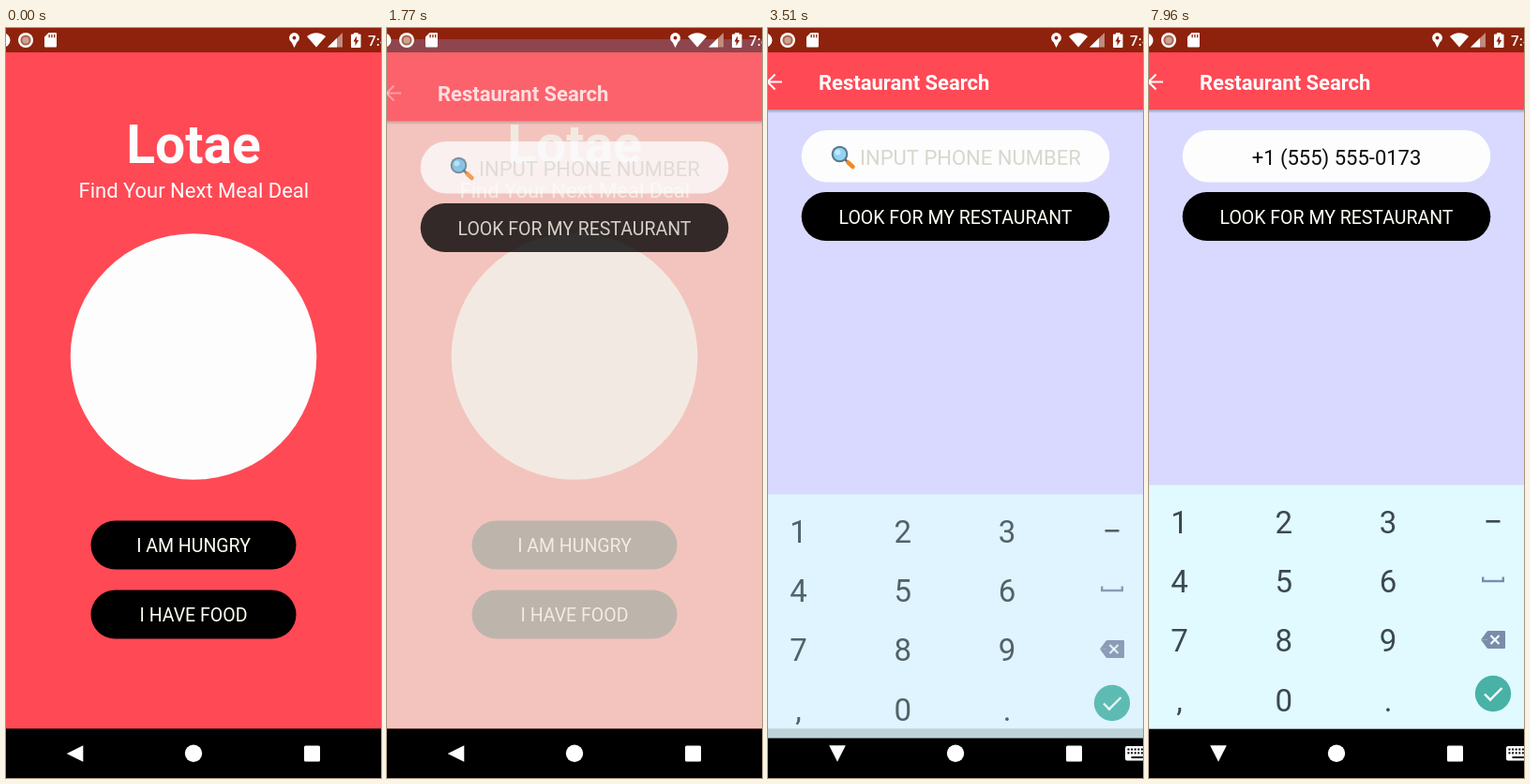
Write an HTML page with a canvas that moves like this. It is 400 px wide and 800 px high and loops after 8000 ms.

```html
<!DOCTYPE html>
<html lang="en">
<head>
<meta charset="utf-8">
<title>Meal deals</title>
<style>
  html, body { margin: 0; width: 100%; height: 100%; overflow: hidden; background: #000; }
  canvas { display: block; width: 400px; height: 800px; }
</style>
</head>
<body>
<canvas id="stage" width="400" height="800"></canvas>
<script>
const ctx = document.getElementById('stage').getContext('2d');
const LOOP = 8000;
const MID = 200;
const NAV_TOP = 747.5, STATUS_BOTTOM = 26;
const RED = '#ff4955', LAVENDER = '#d9d9ff', WARM = '#f0e6da';
const STATUS = '#8e220c', WHITE = '#fdfdfe', SOFT = '#7b8ca9';
const PHONE = '+1 (555) 555-0173';
const FOCUS = 2840;
const BURSTS = [
  { at: 3820, step: 490, from: 6, to: 7 },
  { at: 5830, step: 265, from: 10, to: 12 },
  { at: 7140, step: 77, from: 14, to: 17 },
];

function rect(x, y, w, h, color, r = 0) {
  ctx.fillStyle = color;
  ctx.beginPath();
  ctx.roundRect(x, y, w, h, r);
  ctx.fill();
}

function circle(x, y, r, color) {
  ctx.fillStyle = color;
  ctx.beginPath();
  ctx.arc(x, y, r, 0, Math.PI * 2);
  ctx.fill();
}

function line(color, width, x1, y1, x2, y2) {
  ctx.strokeStyle = color;
  ctx.lineWidth = width;
  ctx.beginPath();
  ctx.moveTo(x1, y1);
  ctx.lineTo(x2, y2);
  ctx.stroke();
}

// Right-angled corner at (x, y) with legs w and h, which may be negative.
function corner(x, y, w, h, color) {
  ctx.fillStyle = color;
  ctx.beginPath();
  ctx.moveTo(x, y);
  ctx.lineTo(x + w, y);
  ctx.lineTo(x, y + h);
  ctx.fill();
}

// Isosceles triangle whose tip points along (dx, dy).
function pointer(x, y, half, dx, dy, color) {
  ctx.fillStyle = color;
  ctx.beginPath();
  ctx.moveTo(x + dx * half, y + dy * half);
  ctx.lineTo(x - dx * half + dy * half, y - dy * half + dx * half);
  ctx.lineTo(x - dx * half - dy * half, y - dy * half - dx * half);
  ctx.fill();
}

function text(str, x, y, size, color, { weight = 400, align = 'center' } = {}) {
  ctx.font = `${weight} ${size}px Roboto, sans-serif`;
  ctx.textAlign = align;
  ctx.fillStyle = color;
  ctx.fillText(str, x, y);
}

function pillButton(label, y, w) {
  rect(MID - w / 2, y, w, 52, '#000', 26);
  text(label, MID, y + 33.7, 19.5, '#fffff4');
}

function drawHome() {
  rect(0, STATUS_BOTTOM, 400, NAV_TOP - STATUS_BOTTOM, RED);
  text('Lotae', MID, 144, 57, WHITE, { weight: 700 });
  text('Find Your Next Meal Deal', MID + 0.3, 181, 22, WHITE);
  circle(MID, 350.5, 131.3, WHITE);
  pillButton('I AM HUNGRY', 525.6, 219);
  pillButton('I HAVE FOOD', 599.6, 219);
}

function drawMagnifier(x, y) {
  ctx.lineCap = 'round';
  line('#5d6870', 2.5, x, y, x + 8, y + 8);
  line('#f08a24', 4.5, x + 9, y + 9, x + 14, y + 13.5);
  ctx.lineCap = 'butt';
  circle(x, y, 8.8, '#5b7686');
  circle(x, y, 6.8, '#8fd3f6');
  circle(x - 2, y - 2, 3, '#c4eafc');
}

// How much of the number is typed, and when the last key was pressed.
function typing(t) {
  const burst = BURSTS.findLast(({ at }) => t >= at);
  if (!burst) return { length: 0, last: FOCUS };
  const { at, step, from, to } = burst;
  const keys = Math.min(to - from, Math.floor((t - at) / step));
  return { length: from + keys, last: at + keys * step };
}

function drawInput(t) {
  rect(35.7, 109, 328.6, 55.5, WHITE, 27.75);
  const { length, last } = typing(t);
  let caretX = 64.5;
  if (length) {
    const typed = PHONE.slice(0, length);
    text(typed, MID, 145.5, 22, '#0c0c0c');
    caretX = MID + 0.5 + ctx.measureText(typed).width / 2;
  } else {
    drawMagnifier(76.5, 134.5);
    text('INPUT PHONE NUMBER', 98, 145.5, 22, '#d8d7ce', { align: 'left' });
  }
  const caretOn = t >= FOCUS && (t - last) % 1050 < 580;
  if (caretOn) rect(caretX, 122.5, 2, 29, '#129588');
}

function drawBackArrow(y) {
  line('#fff', 2, 0, y, 15, y);
  for (const side of [-8, 8]) line('#fff', 2, -0.5, y, 7.5, y + side);
}

// Each layer fades on its own, so overlapping layers tint each other.
function drawSearch(t, shown, dy) {
  ctx.save();
  ctx.beginPath();
  ctx.rect(0, 0, 400, NAV_TOP);
  ctx.clip();
  ctx.translate(0, dy);
  ctx.globalAlpha = shown;
  rect(0, 0, 400, NAV_TOP, shown < 0.9 ? WARM : LAVENDER);
  rect(0, 0, 400, 87, RED);
  const shadow = ctx.createLinearGradient(0, 87, 0, 91);
  shadow.addColorStop(0, 'rgba(110,100,110,.55)');
  shadow.addColorStop(1, 'rgba(110,100,110,0)');
  rect(0, 87, 400, 4, shadow);
  text('Restaurant Search', 54, 65.7, 22, '#fff', { weight: 700, align: 'left' });
  drawInput(t);
  pillButton('LOOK FOR MY RESTAURANT', 175.1, 328.6);
  ctx.globalAlpha = shown ** 4;
  drawBackArrow(57.5);
  ctx.restore();
}

function drawStatusBar(shown, dy) {
  rect(0, 0, 400, STATUS_BOTTOM, STATUS);
  if (dy < STATUS_BOTTOM) {
    ctx.globalAlpha = Math.min(shown, (1 - shown) * 2.4);
    rect(0, dy, 400, STATUS_BOTTOM - dy, '#92678c');
    ctx.globalAlpha = 1;
  }

  circle(-3, 13, 7.5, '#fff');
  circle(21, 13, 8, '#fff');
  circle(21, 13, 5.6, '#a9644f');
  circle(21, 13, 3.6, '#cfa292');

  rect(41, 5, 13, 15.5, '#fff', 1);
  corner(41, 5, 4.5, 4.5, STATUS);
  for (let i = 0; i < 3; i++) rect(45.5 + i * 2.8, 7, 1.3, 3.2, STATUS);

  circle(307.5, 10.5, 5.4, '#fff');
  pointer(307.5, 16.8, 4.2, 0, 1, '#fff');
  circle(307.5, 10.5, 1.9, STATUS);

  ctx.fillStyle = '#fff';
  ctx.beginPath();
  ctx.moveTo(331, 20.5);
  ctx.arc(331, 20.5, 15.2, -Math.PI * 0.73, -Math.PI * 0.27);
  ctx.fill();

  corner(359, 20.5, -16, -15.5, '#c08a7d');
  corner(353, 20.5, -10, -9.7, '#fff');

  rect(371, 5, 4.5, 3, '#fff');
  rect(368, 6.5, 10.5, 14.5, '#fff', 1);
  corner(374, 14.5, -3.5, -6, STATUS);
  corner(372.5, 13, 3.7, 6, STATUS);
  text('7:43', 386, 18.5, 15.5, '#fff', { weight: 500, align: 'left' });
}

function drawKeyboardIcon(x, y) {
  rect(x, y, 24, 15.5, '#fff', 2);
  for (let i = 0; i < 10; i++) {
    rect(x + 2.5 + (i % 5) * 3.6, y + 2.5 + Math.floor(i / 5) * 3.8, 2, 2, '#000');
  }
  rect(x + 6.5, y + 11, 13, 2, '#000');
}

function drawNavBar(keyboardOpen) {
  rect(0, NAV_TOP, 400, 800 - NAV_TOP, '#000');
  if (keyboardOpen) {
    pointer(74, 774, 8.8, 0, 1, '#fff');
    drawKeyboardIcon(381, 766);
  } else {
    pointer(73.5, 774, 8.8, -1, 0, '#fff');
  }
  circle(MID, 773.7, 9.2, '#fff');
  rect(318, 765.5, 17, 17, '#fff', 1.5);
}

function drawKeyboard(t) {
  if (t < 3510) return;
  const ink = '#3b484f', column = 367;
  ctx.save();
  if (t < 3610) {
    ctx.translate(0, 10);
    ctx.globalAlpha = 0.85;
  }
  rect(0, 487.5, 400, 260, '#e1faff');
  ['123', '456', '789', ',0.'].forEach((row, r) =>
    [...row].forEach((key, c) => text(key, 32.5 + c * 111.3, 538.5 + r * 63.4, 33, ink)));

  rect(column - 7.5, 525, 15, 2.6, ink);
  rect(column - 12, 588.8, 24, 2.4, SOFT);
  for (const x of [column - 12, column + 9.6]) rect(x, 585.5, 2.4, 4, SOFT);

  rect(column - 6, 643, 19, 19, SOFT, 1);
  pointer(column - 9.5, 652.5, 0, -1, 0, SOFT);
  corner(column - 6, 652.5, -7, -9.5, SOFT);
  corner(column - 6, 652.5, -7, 9.5, SOFT);
  for (const s of [-4.5, 4.5]) line('#f2fbff', 2.2, column - 2.5, 652.5 - s, column + 6.5, 652.5 + s);

  circle(column, 710, 19.2, '#48b2a7');
  line('#fff', 2.4, column - 9, 710.5, column - 2.2, 717.3);
  line('#fff', 2.4, column - 3.8, 717.3, column + 9.5, 704);
  ctx.restore();
}

function searchProgress(t) {
  if (t < 1730) return 0;
  const stepped = 1690 + 40 * Math.floor((t - 1690) / 40);
  const u = Math.min(1, (stepped - 1683) / 327);
  return 1 - (1 - u) ** 5;
}

function draw(t) {
  const shown = searchProgress(t);
  const dy = Math.round(58 * (1 - shown));
  if (shown < 1) drawHome();
  if (shown > 0) drawSearch(t, shown, dy);
  drawStatusBar(shown, dy);
  drawNavBar(t >= FOCUS + 90);
  drawKeyboard(t);
}

const start = performance.now();
function frame() {
  draw((performance.now() - start) % LOOP);
  requestAnimationFrame(frame);
}
frame();
</script>
</body>
</html>
```
